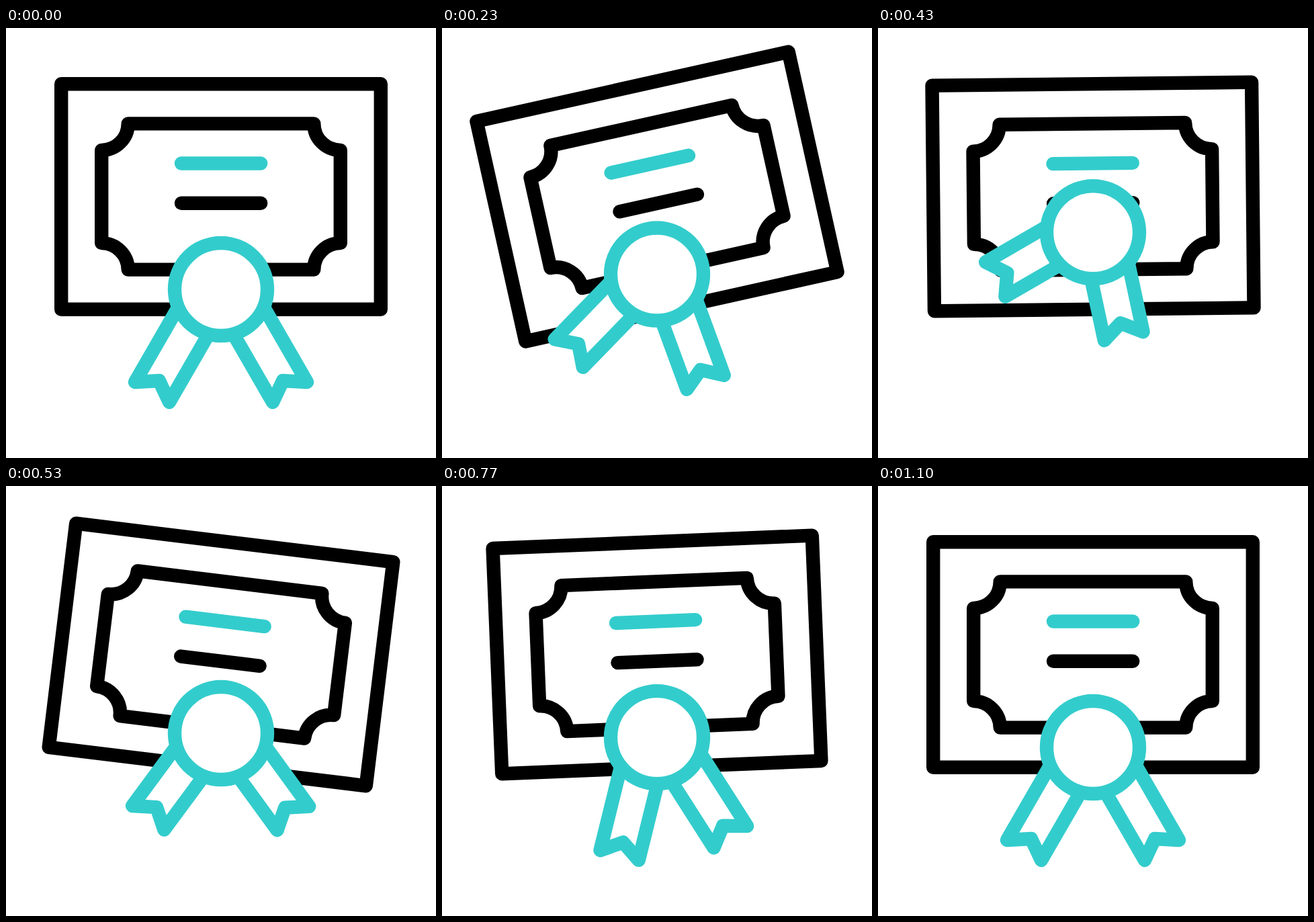
An HTML page that plays this animation: 640 px wide and 640 px high, repeating every 1.67 s.

```html
<!DOCTYPE html>
<html lang="en">
<head>
<meta charset="utf-8">
<title>Certificate</title>
<style>
  html, body { margin: 0; width: 100%; height: 100%; overflow: hidden; background: #fff; }
  svg { display: block; width: 100%; height: 100%; }
  svg * { stroke-linecap: round; stroke-linejoin: round; }
  .ink { stroke: #000; }
  .teal { stroke: #33cccc; }
</style>
</head>
<body>
<svg viewBox="0 0 640 640" stroke-width="20.4" fill="#fff">
  <defs>
    <path id="ribbon" class="teal" d="M257 414.4L192 527L228 525L243 557L300.5 457.4"/>
  </defs>
  <g id="sheet">
    <rect class="ink" x="82.2" y="83.2" width="475.6" height="335.6"/>
    <path class="ink" d="M181.7 142.4H458.3A39.5 39.5 0 0 0 497.8 181.9V320.1A39.5 39.5 0 0 0 458.3 359.6H181.7A39.5 39.5 0 0 0 142.2 320.1V181.9A39.5 39.5 0 0 0 181.7 142.4Z"/>
    <path class="teal" d="M261 201.5H379.2"/>
    <path class="ink" d="M261 260.7H379.2"/>
  </g>
  <g id="badge">
    <g id="left"><use href="#ribbon"/></g>
    <g id="right"><use href="#ribbon" transform="translate(640 0) scale(-1 1)"/></g>
    <circle class="teal" cx="320" cy="389" r="69"/>
  </g>
</svg>
<script>
  const LOOP = 1670, STEPS = 50, END = 33;
  const el = id => document.getElementById(id);
  const sheet = el('sheet'), badge = el('badge'), left = el('left'), right = el('right');

  const smooth = x => x * x * (3 - 2 * x);
  const clamp = x => Math.min(1, Math.max(0, x));

  // Eased path that starts at rest, visits each peak and comes back to rest
  function swing(step, times, peaks) {
    let value = 0;
    times.slice(1).forEach((end, i) => {
      const change = (peaks[i] || 0) - (peaks[i - 1] || 0);
      value += change * smooth(clamp((step - times[i]) / (end - times[i])));
    });
    return value;
  }

  // The sheet rocks, each swing about half the one before
  const tilt = step =>
    swing(step, [0, 10, 15, 21, 27, END], [0, 1, 2, 3].map(i => -16 * (-0.487) ** i));

  // Badge parts share their start and settling time
  const follow = (step, first, second, ...peaks) =>
    swing(step, [4, first, second, 26, END], peaks);

  // Ribbons are drawn in under the medal once, then let out again
  const tuck = step => 23 * Math.sin(Math.PI * clamp((step - 3) / 20)) ** 2;

  function hang(node, angle, slide, side) {
    node.setAttribute('transform',
      `rotate(${angle} 320 389) translate(${side * slide * 0.5} ${-slide * 0.866})`);
  }

  // Steps begin on whole hundredths of a second
  function stepAt(t) {
    const k = Math.floor((t + 5) * STEPS / LOOP + 0.01);
    return Math.round(k * 10 / 3) * 10 > t ? k - 1 : k;
  }

  function draw(t) {
    const step = stepAt(t), slide = tuck(step);
    sheet.setAttribute('transform', `rotate(${tilt(step)} 320 251)`);
    badge.setAttribute('transform', `translate(0 ${follow(step, 12.9, 19, -85, 40, -50.5)})`);
    hang(left, follow(step, 11, 21.3, 36, -25.7, 6.3), slide, 1);
    hang(right, follow(step, 11, 19, 25, -20.5, 9), slide, -1);
  }

  const start = performance.now();
  function tick() {
    draw((performance.now() - start) % LOOP);
    requestAnimationFrame(tick);
  }
  tick();
</script>
</body>
</html>
```
